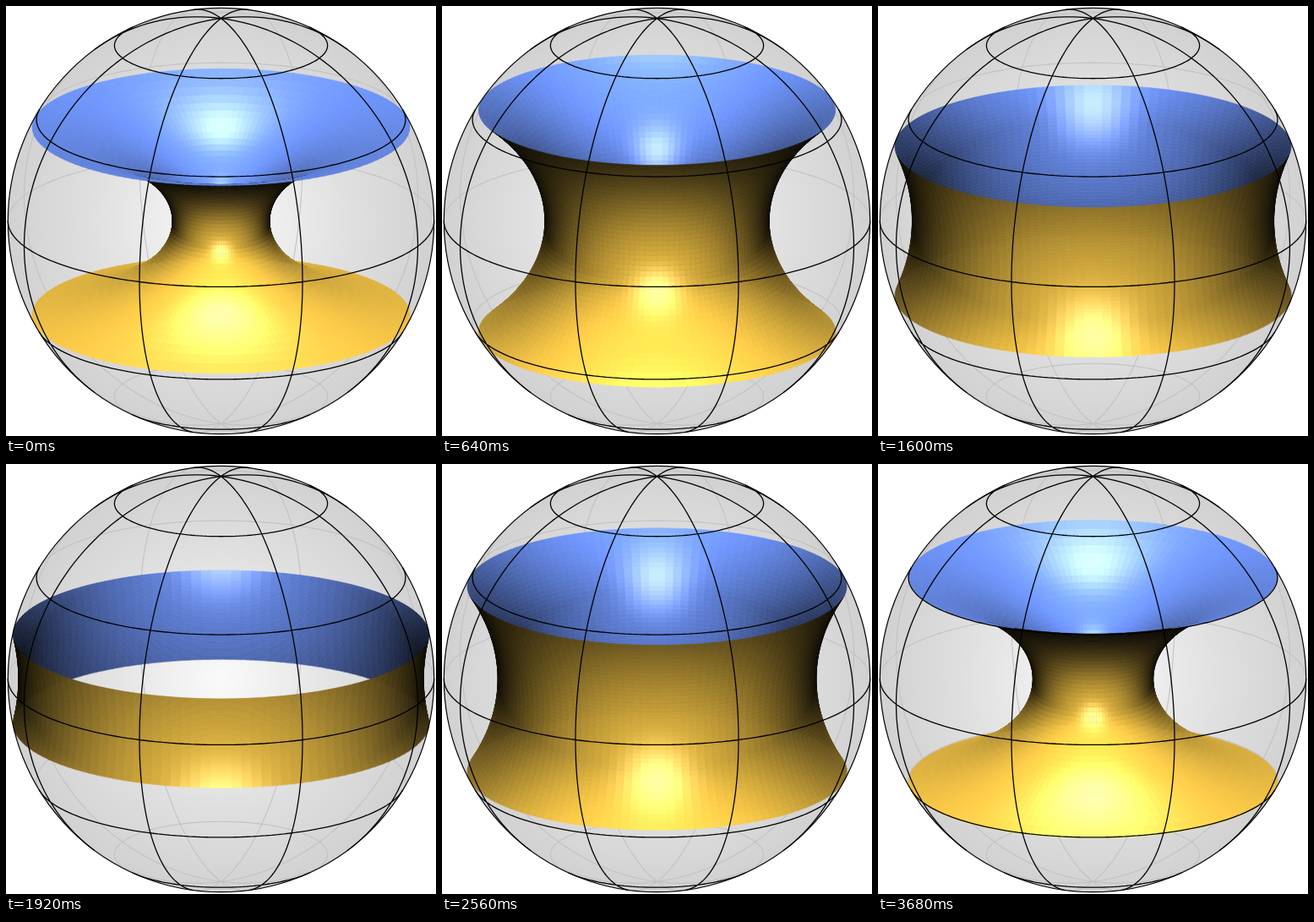
Recreate the animation shown at these times as an HTML page with a canvas. Size 509 by 509 pixels, loop 3840 ms.

```html
<!DOCTYPE html>
<html lang="en">
<head>
<meta charset="utf-8">
<title>Catenoid in a sphere</title>
<style>
html, body { margin: 0; height: 100%; overflow: hidden; background: #fff; }
canvas { display: block; }
</style>
</head>
<body>
<canvas id="stage" width="509" height="509"></canvas>
<script>
const ctx = document.getElementById('stage').getContext('2d');
const CENTER = 254.5, RADIUS = 252.2, STEP = 160, STEPS = 24;
const RAD = Math.PI / 180;
const SIN = Math.sin(18 * RAD), COS = Math.cos(18 * RAD);   // camera elevation
const GOLD = [255, 205, 72], BLUE = [112, 151, 255];
const RINGS = 44, SEGMENTS = 128;

// Half height of the catenoid in units of its neck radius, for half a loop
const EXTENT = [2.035, 1.785, 1.536, 1.287, 1.04, 0.92, 0.81, 0.708, 0.61, 0.5225, 0.434, 0.34, 0.231];

// x points right, y towards the viewer, z up
const project = (x, y, z) => [CENTER + RADIUS * x, CENTER + RADIUS * (y * SIN - z * COS)];
const depth = (x, y, z) => y * COS + z * SIN;
const along = (y, z, elevation) => Math.max(0, y * Math.cos(elevation * RAD) + z * Math.sin(elevation * RAD));

function shade(x, y, z) {
  const outside = depth(x, y, z) > 0;
  if (!outside) { y = -y; z = -z; }
  const facing = along(y, z, 18);
  const diffuse = 0.06 + 0.84 * facing ** 1.7 + 0.8 * along(y, z, 105);
  const shine = 95 * (facing ** 60 + along(y, z, 61.5) ** 60);
  const rgb = (outside ? GOLD : BLUE).map(v => Math.min(255, Math.round(v * diffuse + shine)));
  return `rgb(${rgb})`;
}

function drawCatenoid(extent) {
  const neck = 1 / Math.hypot(Math.cosh(extent), extent);   // rims lie on the unit sphere
  const point = (u, a) => [neck * Math.cosh(u) * Math.cos(a), neck * Math.cosh(u) * Math.sin(a), neck * u];
  const du = 2 * extent / RINGS, da = 2 * Math.PI / SEGMENTS;
  const quads = [];
  for (let i = 0; i < RINGS; i++) {
    for (let j = 0; j < SEGMENTS; j++) {
      const u = i * du - extent, a = j * da, um = u + du / 2, am = a + da / 2, k = Math.cosh(um);
      quads.push({
        near: depth(...point(um, am)),
        color: shade(Math.cos(am) / k, Math.sin(am) / k, -Math.tanh(um)),
        corners: [[u, a], [u + du, a], [u + du, a + da], [u, a + da]].map(c => project(...point(...c)))
      });
    }
  }
  quads.sort((p, q) => p.near - q.near);
  ctx.lineWidth = 0.6;
  ctx.lineJoin = 'round';
  for (const { color, corners } of quads) {
    ctx.beginPath();
    corners.forEach(c => ctx.lineTo(...c));
    ctx.closePath();
    ctx.fillStyle = ctx.strokeStyle = color;
    ctx.fill();
    ctx.stroke();
  }
}

const spherePoint = (lat, lon) => [
  Math.cos(lat * RAD) * Math.sin(lon * RAD),
  Math.cos(lat * RAD) * Math.cos(lon * RAD),
  Math.sin(lat * RAD)
];

function drawGrid(front, color, width) {
  const trace = curve => {
    for (let d = 0; d < 360; d += 2) {
      if (depth(...curve(d + 1)) > 0 !== front) continue;
      ctx.moveTo(...project(...curve(d)));
      ctx.lineTo(...project(...curve(d + 2)));
    }
  };
  ctx.beginPath();
  for (let lat = -60; lat <= 60; lat += 30) trace(d => spherePoint(lat, d));
  for (let lon = 22.5; lon < 180; lon += 45) trace(d => spherePoint(d, lon));
  ctx.strokeStyle = color;
  ctx.lineWidth = width;
  ctx.lineCap = 'round';
  ctx.stroke();
}

const glass = ctx.createRadialGradient(CENTER, CENTER, 0, CENTER, CENTER, RADIUS);
[[0, 250], [0.25, 239], [0.62, 223], [0.85, 215], [1, 209]]
  .forEach(([at, v]) => glass.addColorStop(at, `rgb(${v},${v},${v})`));

function drawBall(paint) {
  ctx.beginPath();
  ctx.arc(CENTER, CENTER, RADIUS, 0, 2 * Math.PI);
  paint();
}

function draw(step) {
  ctx.fillStyle = '#fff';
  ctx.fillRect(0, 0, 509, 509);
  ctx.fillStyle = glass;
  drawBall(() => ctx.fill());
  drawGrid(false, '#c2c2c2', 1.1);
  drawCatenoid(EXTENT[Math.min(step, STEPS - step)]);
  drawGrid(true, '#000', 1.3);
  ctx.lineWidth = 1.2;
  drawBall(() => ctx.stroke());
}

let shown = -1;
function tick() {
  const step = Math.floor(performance.now() / STEP) % STEPS;
  if (step !== shown) draw(shown = step);
  requestAnimationFrame(tick);
}
tick();
</script>
</body>
</html>
```
